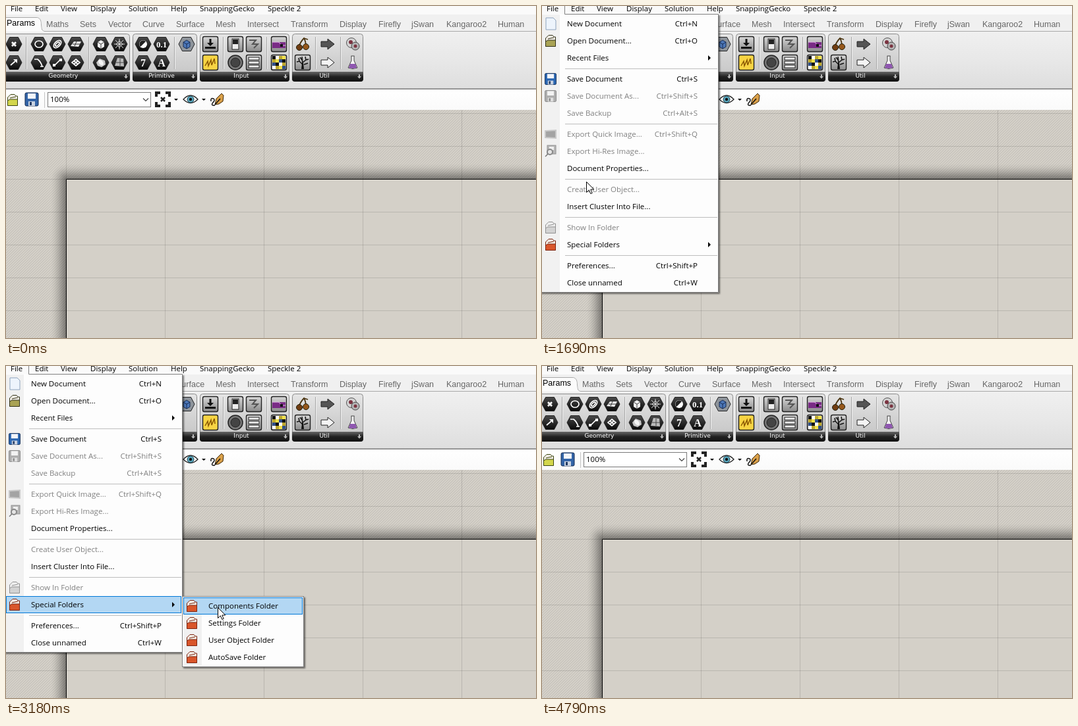
Write an HTML page that moves like this. It is 804 px wide and 505 px high and loops after 6650 ms.

```html
<!DOCTYPE html>
<html lang="en">
<head>
<meta charset="utf-8">
<title>Opening the components folder</title>
<style>
html, body { margin: 0; width: 100%; height: 100%; overflow: hidden; background: #d4d0c8; }
svg { display: block; }
text { font: 11.5px "Open Sans", "Noto Sans", sans-serif; fill: #000; white-space: pre; }
.tab { font: 12.5px "Liberation Sans", Arial, sans-serif; fill: #666; }
.tab.on { fill: #000; }
.cap { font: 9px "DejaVu Sans", sans-serif; fill: #fff; text-anchor: middle; }
.num { font: bold 16px "Liberation Serif", serif; fill: #fff; text-anchor: middle; }
.num.small { font-size: 13px; }
.off { fill: #808080; }
.hint { fill: #575757; }
.dim { filter: grayscale(1); opacity: .55; }
.end { text-anchor: end; }
.w { fill: none; stroke: #fff; stroke-width: 1.7; }
.k { fill: none; stroke: #111; stroke-width: 1.5; }
.hot { fill: #b3d7f3; stroke: #0078d7; }
.shade { filter: drop-shadow(2px 2px 1px rgba(0, 0, 0, .5)); }
</style>
</head>
<body>
<svg id="stage" width="804" height="505" viewBox="0 0 804 505"></svg>
<script>
const LOOP = 6650;
const $ = id => document.getElementById(id);
const rect = (x, y, w, h, fill, extra = '') => `<rect x="${x}" y="${y}" width="${w}" height="${h}" fill="${fill}" ${extra}/>`;
const path = (d, extra) => `<path d="${d}" ${extra}/>`;
const text = (x, y, s, cls = '') => `<text x="${x}" y="${y}" class="${cls}">${s}</text>`;
const at = (x, y, body, extra = '') => `<g transform="translate(${x} ${y})" ${extra}>${body}</g>`;
const white = d => path(d, 'class="w"');
const solid = (d, fill, extra = '') => path(d, `fill="${fill}" ${extra}`);
const dark = d => path(d, 'class="k"');
const grad = (id, colors, dir = 'x2="0" y2="1"') => `<linearGradient id="${id}" ${dir}>` +
  colors.map((c, i) => `<stop offset="${i / (colors.length - 1)}" stop-color="${c}"/>`).join('') + '</linearGradient>';

const shadow = ['rgba(0,0,0,0)', 'rgba(0,0,0,.05)', 'rgba(0,0,0,.15)', 'rgba(0,0,0,.28)', 'rgba(0,0,0,.41)'];
const defs = `<defs>
  ${grad('bar', ['#666', '#222', '#111'])}
  ${grad('panel', ['#e6e6e6', '#d2d2d2', '#c4c4c4'])}
  ${grad('ribbon', ['#f0f0f0', '#e8e8e8', '#dedede'])}
  ${grad('hex', ['#4a4a4a', '#0a0a0a'])}
  ${grad('tile', ['#d8d8d8', '#8a8a8a'])}
  ${grad('tools', ['#fff', '#fafafa'])}
  ${grad('top', shadow)}
  ${grad('left', shadow, 'x2="1" y2="0"')}
  <radialGradient id="corner" cx="1" cy="1" r="1">
    ${[...shadow].reverse().map((c, i) => `<stop offset="${i / 4}" stop-color="${c}"/>`).join('')}
  </radialGradient>
  <pattern id="hatch" width="4" height="4" patternUnits="userSpaceOnUse">
    ${rect(0, 0, 4, 4, '#d4d0c8')}${path('M-1 5L5 -1M-1 1L1 -1M3 5L5 3', 'stroke="#000" stroke-opacity=".1" stroke-width=".9"')}
  </pattern></defs>`;

function canvas() {
  let grid = '';
  for (let x = 91.5; x < 804; x += 150) grid += `M${x} 158V505`;
  for (let y = 163.5; y < 505; y += 50) grid += `M0 ${y}H804`;
  return rect(0, 158, 804, 347, 'url(#hatch)') + rect(91, 263, 713, 242, '#d4d0c8') +
    path(grid, 'stroke="#000" stroke-opacity=".12"') +
    rect(91, 240, 713, 23, 'url(#top)') + rect(68, 263, 23, 242, 'url(#left)') +
    rect(68, 240, 23, 23, 'url(#corner)') +
    path('M804 263.5H91.5V505', 'fill="none" stroke="#000"');
}

function tabs() {
  const menu = [[7, 'File'], [44, 'Edit'], [83, 'View'], [128, 'Display'], [186, 'Solution'], [250, 'Help'],
    [294, 'SnappingGecko'], [397, 'Speckle 2']];
  const names = [[61, 'Maths'], [112, 'Sets'], [155, 'Vector'], [207, 'Curve'], [258, 'Surface'], [318, 'Mesh'],
    [366, 'Intersect'], [432, 'Transform'], [506, 'Display'], [565, 'Firefly'], [615, 'jSwan'],
    [668, 'Kangaroo2'], [746, 'Human']];
  return rect(0, 0, 804, 13, '#fafafa') + rect(0, 13, 804, 26, '#f0f0f0') + rect(0, 38, 804, 88, 'url(#ribbon)') +
    path('M0 17.5H46Q52 17.5 53 24L54 34Q55 38.5 59 38.5H804', 'fill="none" stroke="#a8a8a8"') +
    solid('M0 18H46Q51.5 18 52.5 24L53.5 34Q54 38 58 39H0Z', '#fbfbfb') +
    rect(0, 125, 804, 1, '#a0a0a0') + rect(0, 126, 804, 1, '#888') + rect(0, 127, 804, 31, 'url(#tools)') +
    rect(0.5, -2, 34, 14, '#fafafa', 'id="file"') +
    menu.map(([x, s]) => text(x, 8, s)).join('') + text(1, 30, 'Params', 'tab on') +
    names.map(([x, s]) => text(x, 32, s, 'tab')).join('');
}

const hex = (x, y, body, fill = 'url(#hex)') =>
  at(x, y, solid('M-12 0L-6.5 -10.5H6.5L12 0L6.5 10.5H-6.5Z', fill, 'stroke="#222" stroke-linejoin="round"') + body);
const tile = (x, y, body, fill = 'url(#tile)') =>
  at(x, y, rect(-11.5, -11.5, 23, 23, fill, 'rx="2.5" stroke="#222" stroke-width="1.4"') + body);
const ring = (rx, ry, turn = 0, extra = 'class="w"') => `<ellipse rx="${rx}" ry="${ry}" transform="rotate(${turn})" ${extra}/>`;
const num = (s, cls = '') => text(0, cls ? 4.5 : 5.5, s, 'num ' + cls);

function panel(x, w, name, mid, seps) {
  const r = x + w;
  return rect(x + .5, 42.5, w - 1, 72, 'url(#panel)', 'rx="4" stroke="#8c8c8c"') +
    solid(`M${x} 100H${r}V111Q${r} 115 ${r - 4} 115H${x + 4}Q${x} 115 ${x} 111Z`, 'url(#bar)') +
    seps.map(s => rect(s, 47, 1, 49, '#a6a6a6') + rect(s + 1, 47, 1, 49, '#f2f2f2')).join('') +
    solid(`M${r - 7} 104h2v3h2l-3 3.5l-3 -3.5h2z`, '#bbb') + text(mid, 109, name, 'cap');
}

function ribbon() {
  const cube = 'M-5 -3L0 -6L5 -3V4L0 7L-5 4Z';
  let checks = '';
  for (let i = 0; i < 16; i++)
    checks += rect(-10 + i % 4 * 5, -10 + (i >> 2) * 5, 5, 5, ['#111', '#f2e14a', '#fff', '#304f86', '#bca62c'][(i * 7 + (i >> 2)) % 5]);
  const lines = [-6, 0, 6].map(y => rect(-8, y - 2, 16, 4, '#eee', 'stroke="#222"')).join('');
  return panel(-6, 194, 'Geometry', 87, [30, 125]) + panel(192, 98, 'Primitive', 236, [255]) +
    panel(294, 136, 'Input', 357, [329, 395]) + panel(434, 108, 'Util', 483, [469, 507]) +
    hex(12, 58, path('M-3 -3L3 3M3 -3L-3 3', 'stroke="#fff" stroke-width="2.8"')) +
    hex(12, 86, white('M-5 4L2 -2') + solid('M-1 -5H5V1Z', '#fff')) +
    hex(50, 58, ring(6, 5)) +
    hex(78, 58, ring(7, 4, -45) + ring(4, 1.8, -45)) +
    hex(106, 58, solid('M-8 3L-3 -4L8 -4L4 4Z', '#eee') + path('M-5 0L6 0M1 -4L-2 3', 'stroke="#333" fill="none"')) +
    hex(50, 86, white('M-7 -5H-2Q3 -1 5 6M2 6H7')) +
    hex(78, 86, white('M-4 4L4 -4') + rect(-7, 2, 4, 4, '#fff') + rect(3, -6, 4, 4, '#fff')) +
    hex(106, 86, white('M0 -5L6 0L0 5L-6 0ZM-3 -2.5L3 2.5M3 -2.5L-3 2.5')) +
    hex(144, 58, solid(cube, '#eee') + path('M-5 -3L0 0L5 -3M0 0V7', 'stroke="#444" fill="none"')) +
    hex(172, 58, path('M-6 -6L6 6M6 -6L-6 6M0 -8V8M-8 0H8M0 -5L5 0L0 5L-5 0Z', 'stroke="#ddd" fill="none"')) +
    hex(144, 86, solid('M-7 0L-2 -6L6 -3L7 3L1 7L-5 5Z', '#c8c8c8') + ring(3, 5, -40, 'fill="#f4f4f4"')) +
    hex(172, 86, solid('M-3 -7L6 -6L7 6L-7 5Z', '#bbb') + path('M-5 0H7M1 -6V5', 'stroke="#444"')) +
    hex(208, 58, ring(6, 6, 0, 'fill="#fff"') + solid('M-4 4A5.5 5.5 0 0 1 4 -4Z', '#222')) +
    hex(236, 58, num('0.1', 'small')) + hex(208, 86, num('7')) + hex(236, 86, num('A')) +
    hex(274, 58, solid(cube, '#4c77b8', 'stroke="#182c52"') + path('M-5 -3L0 0L5 -3M0 0V7', 'stroke="#182c52" fill="none"'), '#8e949b') +
    tile(310, 58, solid('M-1.5 -8H1.5V-2H5L0 3L-5 -2H-1.5Z', '#111') + rect(-8, 4, 16, 3, '#111')) +
    tile(310, 86, path('M-8 5L-4 -2L-3 5L1 -4L2 4L6 -6L7 2', 'fill="none" stroke="#8a5800" stroke-width="1.5"'), '#f7d443') +
    tile(348, 58, rect(-5, -8, 10, 16, '#eee', 'stroke="#222"') + rect(-4, -7, 8, 7, '#222')) +
    tile(376, 58, path('M-7 -6H3L-2 0H6L0 6', 'fill="none" stroke="#555" stroke-width="2"')) +
    at(348, 86, ring(11, 11, 0, 'fill="#777" stroke="#222" stroke-width="1.5"') + ring(7, 7, 0, 'fill="#444" stroke="#222"')) +
    tile(376, 86, lines) +
    tile(414, 58, rect(-10, -3, 20, 9, '#7a2c86') + path('M-10 -3H0L4 2H10', 'stroke="#e5b8ec" fill="none"') + rect(2, 0, 4, 4, '#111')) +
    tile(414, 86, checks) +
    at(450, 58, path('M-6 4Q-3 -4 2 -9Q5 -4 5 4M2 -9L8 -7', 'fill="none" stroke="#4b3512" stroke-width="1.8"') +
      '<circle cx="-5" cy="5" r="4.5" fill="#713d12" stroke="#221"/><circle cx="5" cy="4" r="4.5" fill="#96581b" stroke="#221"/>') +
    tile(450, 86, solid('M-2 10L-1 1H1L2 10Z', '#111') +
      dark('M0 3L-5 -2L-9 -1M-5 -2L-6 -7M0 3L-1 -9M-1 -4L-4 -8M0 0L5 -4L4 -9M5 -4L9 -5M2 3L8 1')) +
    [[58, '#555'], [86, '#f4f4f4']].map(([y, c]) => at(488, y, solid('M-10 -4H0V-8L10 0L0 8V4H-10Z', c, 'stroke="#222"'))).join('') +
    at(526, 58, '<circle cx="-2" cy="-2" r="7.5" fill="#d4d4d4" stroke="#555"/><circle cx="-3" cy="-3" r="3" fill="#7b3340"/>' +
      '<circle cx="4" cy="3" r="6" fill="#b4b4b4" stroke="#444"/><circle cx="4" cy="3" r="2.5" fill="#7b3340"/>') +
    at(526, 86, solid('M-2.5 -10H2.5M-2 -10V-3L-7 8Q0 11 7 8L2 -3V-10', '#f5f5f5', 'stroke="#444"') + solid('M-4 2H4L6 8Q0 10 -6 8Z', '#8f57b0'));
}

const disk = c => rect(-10, -10, 20, 20, c, 'rx="2" stroke="#122b52"') + rect(-6, -9, 12, 8, '#f4f6fa') +
  rect(-5, 3, 10, 7, '#c9d2e0') + rect(-3, 4, 3, 5, '#223a63');
const folder = (c, edge) => solid('M-7.5 8V-4L-3 -8.5H3L5 -6H7.5V8Z', '#f1ece4', `stroke="${edge}"`) +
  path('M-4 -3L5 -5', `stroke="${edge}"`) + solid('M-7.5 8.5V1L-4 -1H7.5V8.5Z', c, `stroke="${edge}"`);
const triangle = (x, y) => solid(`M${x - 3} ${y - 1}h6l-3 3z`, '#000');

function toolbar() {
  return at(10, 143, folder('#d3d64c', '#3b4510')) + at(39, 142, disk('#3465a8')) +
    rect(58, 131, 1, 24, '#c4c4c4') + rect(63.5, 131.5, 156, 22, '#fff', 'stroke="#7a7a7a"') + text(67, 146, '100%') +
    path('M208 140.5l4 4l4 -4', 'fill="none" stroke="#444" stroke-width="1.2"') +
    at(238, 142, path('M-10 -4V-10H-4M4 -10H10V-4M10 4V10H4M-4 10H-10V4', 'fill="none" stroke="#222" stroke-width="4"') +
      path('M-3 -3L3 3M3 -3L-3 3', 'stroke="#222" stroke-width="2.5"')) + triangle(258, 142) +
    at(280, 142, solid('M-11 0Q0 -12 11 0Q0 11 -11 0Z', '#fff', 'stroke="#222" stroke-width="1.3"') +
      ring(5, 5, 0, 'fill="#5aa6bd" stroke="#1b4757"') + ring(2.2, 2.2, 0, 'fill="#111"')) + triangle(300, 142) +
    at(320, 143, solid('M-3 7L-1 -2L7 -10L10 -7L9 2L3 6Z', '#d9a04a', 'stroke="#3d2607"') +
      dark('M-3 7L5 -2M-9 2Q-10 -4 -5 -2Q-2 0 -7 5Q-9 9 -3 8'));
}

const rows = [[27, 'New Document', 'Ctrl+N', 1], [53, 'Open Document...', 'Ctrl+O', 1], [79, 'Recent Files', '', 1],
  [111, 'Save Document', 'Ctrl+S', 1], [137, 'Save Document As...', 'Ctrl+Shift+S'], [163, 'Save Backup', 'Ctrl+Alt+S'],
  [195, 'Export Quick Image...', 'Ctrl+Shift+Q'], [221, 'Export Hi-Res Image...', ''], [247, 'Document Properties...', '', 1],
  [279, 'Create User Object...', ''], [305, 'Insert Cluster Into File...', '', 1], [337, 'Show In Folder', ''],
  [363, 'Special Folders', '', 1], [395, 'Preferences...', 'Ctrl+Shift+P', 1], [421, 'Close unnamed', 'Ctrl+W', 1]];
const red = folder('#d9562b', '#7c2410');

function fileMenu() {
  const small = c => `<g transform="scale(.85)">${disk(c)}</g>`;
  return '<g id="menu">' + rect(-5, 12, 273, 424, '#fdfdfd', 'class="shade"') + rect(0, 13, 27, 422, '#f1f1f1') +
    path('M34.5 0V12.5H267.5V435.5H0', 'fill="none" stroke="#808080"') +
    rect(.5, 350.5, 265, 25, '', 'id="hot" class="hot"') +
    [95, 179, 263, 321, 379].map(y => rect(35, y, 231, 1, '#bdbdbd')).join('') +
    rows.map(([y, s, key, on]) => text(38, y + 4, s, on ? '' : 'off') + text(236, y + 4, key, on ? 'end' : 'end off')).join('') +
    [79, 363].map(y => solid(`M252 ${y - 4}l4 4l-4 4z`, '#000')).join('') +
    at(13, 27, solid('M-7 -9H4L8 -5V9H-7Z', '#edf4fc', 'stroke="#8da3bd"')) + at(13, 53, folder('#a9a355', '#33331a')) +
    at(13, 111, small('#2b66b0')) + at(13, 137, small('#777'), 'class="dim"') +
    at(13, 195, solid('M-8 -5L8 -6V6L-8 5Z', '#666', 'stroke="#aaa" stroke-width="2"'), 'class="dim"') +
    at(13, 221, rect(-5, -9, 13, 13, '#888', 'stroke="#444"') + rect(-2, -7, 7, 5, '#eee') +
      at(-1, 1, ring(4, 4, 0, 'fill="#ddd" stroke="#333" stroke-width="2"')) + dark('M-4 4L-8 8'), 'class="dim"') +
    at(13, 337, folder('#bbb', '#444'), 'class="dim"') + at(13, 363, red) + '</g>';
}

function subMenu() {
  const items = ['Components Folder', 'Settings Folder', 'User Object Folder', 'AutoSave Folder'];
  return '<g id="sub">' + rect(267.5, 350.5, 184, 107, '#fdfdfd', 'stroke="#808080" class="shade"') +
    rect(270, 352, 27, 104, '#f1f1f1') + rect(269.5, 352.5, 180, 25, '', 'id="pick" class="hot"') +
    items.map((s, i) => text(307, 369 + i * 26, s) + at(282, 365 + i * 26, red)).join('') + '</g>';
}

const tip = '<g id="tip">' + rect(321.5, 399.5, 340, 20, '#fff', 'stroke="#767676" class="shade"') +
  text(327, 413, 'Open the folder that contains 3rd party Component Libraries', 'hint') + '</g>';
const pointer = '<circle id="click" r="12" fill="#f3df18" fill-opacity=".62"/>' +
  '<g id="cursor">' + solid('M.5 .5V16.5L4.3 12.9L6.8 18.5L9.2 17.5L6.8 12H11.8Z', '#fff', 'stroke="#000"') + '</g>';

$('stage').innerHTML = defs + canvas() + tabs() + ribbon() + toolbar() + fileMenu() + subMenu() + tip + pointer;

// Share of n equal jumps made by time t; the first falls on a, the last on b.
const jumps = (t, a, b, n) => Math.max(0, Math.min(1, (Math.floor((t - a) / (b - a) * (n - 1) + 1e-6) + 1) / n));
const ease = (f, p) => { const u = 1 - (1 - f) ** p; return u * u * (3 - 2 * u); };

// start, end, jumps, easing power, target x, target y
const moves = [[260, 890, 10, 1.6, 23, 16], [950, 1020, 2, 1, 19, 2], [1350, 2100, 12, 1.6, 83, 357],
  [2640, 3180, 9, 1.2, 321, 367], [4450, 4720, 5, 1.2, 333, 478]];

function cursorAt(t) {
  let x = 418, y = 525;
  for (const [a, b, n, p, tx, ty] of moves) {
    const f = ease(jumps(t, a, b, n), p);
    x += (tx - x) * f;
    y += (ty - y) * f;
  }
  return [Math.round(x), Math.round(y)];
}

const show = (id, on) => $(id).style.display = on ? '' : 'none';
const within = (t, a, b) => t >= a && t < b;

function draw(t) {
  const [x, y] = cursorAt(t);
  const open = within(t, 1280, 4450), sub = within(t, 2500, 4450);
  const row = rows.find(([mid, , , on]) => on && Math.abs(y - mid) < 13);
  const hotY = sub ? 363 : row && row[0];
  const hover = within(t, 1020, 1280);

  for (const id of ['cursor', 'click']) $(id).setAttribute('transform', `translate(${x} ${y})`);
  show('cursor', within(t, 260, 4790));
  show('click', within(t, 1210, 1350) || within(t, 2430, 2570) || within(t, 3900, 4450));
  show('menu', open);
  show('sub', sub);
  show('hot', hotY);
  if (hotY) $('hot').setAttribute('y', hotY - 12.5);
  show('pick', x > 268);
  $('file').setAttribute('class', hover ? 'hot' : '');
  $('tip').style.opacity = jumps(t, 3440, 3640, 4) - jumps(t, 4450, 4650, 4);
}

const start = performance.now();
function tick() {
  draw((performance.now() - start) % LOOP);
  requestAnimationFrame(tick);
}
tick();
</script>
</body>
</html>
```
